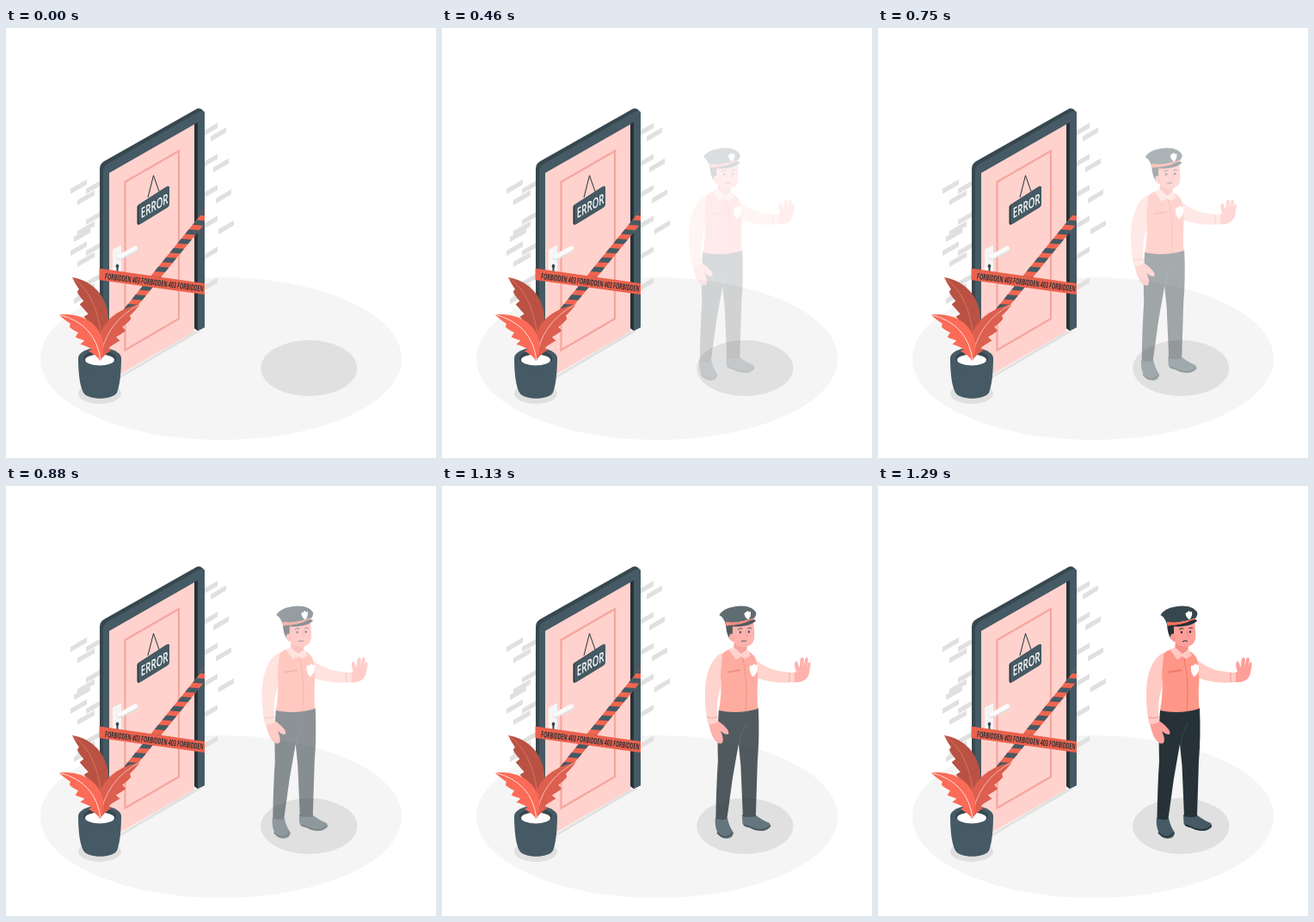
These frames come from a looping animation (500x500 px, 1.33 s). An HTML page:

```html
<!DOCTYPE html>
<html lang="en">
<head>
<meta charset="utf-8">
<title>403 Forbidden</title>
<style>
  html, body { margin: 0; width: 100%; height: 100%; overflow: hidden; background: #fff; }
  svg { display: block; width: 100%; height: 100%; }
  text { font-family: "Open Sans", "Noto Sans", sans-serif; font-weight: 700; }
</style>
</head>
<body>
<svg viewBox="0 0 500 500" xmlns="http://www.w3.org/2000/svg">
  <defs>
    <clipPath id="doorway"><path d="M109 150H231V420H109Z"/></clipPath>
  </defs>

  <ellipse cx="250" cy="384.5" rx="210" ry="94.5" fill="#f5f5f5"/>
  <ellipse cx="352.3" cy="395.5" rx="56" ry="32.5" fill="#e0e0e0"/>
  <path id="bricks" fill="#e0e0e0"/>

  <!-- door -->
  <path d="M120 412L219 353L227 352L133 407Z" fill="#e0e0e0"/>
  <path d="M109 405V164Q109 158 114 155L221 94.500Q224 92.500 228 95L231 98V348L223 352L219 349V116L120 172V405Z" fill="#37474f"/>
  <path d="M113 405V167Q113 161 118 158L225 97Q231 95 231 100V348L223 352V110L120 168V405Z" fill="#455a64"/>
  <path d="M219 112L223 109.500V352L219 349Z" fill="#263238"/>
  <path d="M120 168.500L219 112V353L120 410Z" fill="#ffd2cd"/>
  <path d="M138.500 179L201 143V338L138.500 374.500Z" fill="none" stroke="#f5a69e" stroke-width="2.200"/>

  <!-- sign -->
  <path d="M165 197L171.500 171.500L178 190" fill="none" stroke="#263238"/>
  <path id="sign" d="M154 207.500Q154 205.500 156 204.500L187 184.500Q190 182.500 190 185.500V205Q190 207.500 188 208.500L157 227.500Q154 229 154 226Z" fill="#455a64"/>
  <text transform="matrix(.6 -.34 0 1 156.700 221.500)" font-size="16.300" fill="#fff" style="font-weight: 600">ERROR</text>

  <!-- handle -->
  <path d="M124 257.500L134 252.500V284L124 287Z" fill="#f5f5f5"/>
  <path d="M132 267L150.500 257.500" stroke="#e0e0e0" stroke-width="6" stroke-linecap="round"/>
  <path d="M132 266L150.500 256" stroke="#fafafa" stroke-width="5" stroke-linecap="round"/>
  <path d="M129.500 274.500a2 2.500 0 0 1 1 4.500V284H128.500V279a2 2.500 0 0 1 1-4.500Z" fill="#37474f"/>

  <!-- tapes -->
  <g clip-path="url(#doorway)">
    <g transform="translate(231 219.500) rotate(129.200)">
      <path d="M-12 -5H195V5H-12Z" fill="#f1654f"/>
      <path id="stripes" fill="#455a64"/>
    </g>
  </g>
  <path d="M108.500 279.500L231 297V310L108.500 293Z" fill="#eb614d"/>
  <text transform="matrix(.547 .071 -.12 1 114.800 291.800)" font-size="9.500" fill="#263238">FORBIDDEN 403 FORBIDDEN 403 FORBIDDEN</text>

  <!-- plant -->
  <ellipse cx="109" cy="425" rx="25" ry="12" fill="#e0e0e0"/>
  <path d="M84 384C84 402 86 417 90 424C95 433 124 433 129 424C132 417 134 402 134 384Z" fill="#455a64"/>
  <ellipse cx="109" cy="384" rx="25" ry="12.500" fill="#455a64"/>
  <ellipse cx="109" cy="384" rx="19" ry="9" fill="#37474f"/>
  <ellipse cx="109" cy="386" rx="17" ry="6.500" fill="#fff"/>
  <g id="leaves"></g>

  <!-- guard -->
  <g id="guard" opacity="0">
    <path d="M324 386H338Q340 396 344.500 402Q346 409 337 410Q328 409 326 402Q323 394 324 386Z" fill="#455a64"/>
    <path d="M355 382H370Q379 389 387 392Q391 398 380 401Q369 401 364 397Q357 397 355.500 392Z" fill="#455a64"/>
    <path d="M326 403Q335 413 344.500 403M357 394L365 397Q378 404 388 395" fill="none" stroke="#263238" stroke-width="1.500"/>
    <path d="M328 260Q350 265 374 258Q375.500 290 373 320L371 384Q363 386 356 384L353.500 325L351 300L344 340L337.500 387Q331 389 324.500 386.500Q325 350 327 320Q326 285 328 260Z" fill="#263238"/>
    <path d="M352 303Q353 285 361 276" fill="none" stroke="#37474f"/>

    <path d="M316 275L327 273Q333 277 338 283Q341 288 338 289Q333 288 330 285Q334 293 332.500 298Q330 301 326 298Q319 293 316 275Z" fill="#ff9f99"/>
    <path d="M332 194Q318 200 313 226Q310 248 315 276Q322 278 327 274Q324 251 330 235Z" fill="#ffcac3"/>

    <path d="M412 218L418 216Q415 208 417 204.500Q419.500 202 420 207L422 211L422.500 202Q425 197 427 201.500L426.500 210L428.500 200.500Q431.500 197.500 432 202L430.500 211L432 205.500Q435.500 203.500 434.500 209L432.500 220Q428 230 413 228Z" fill="#ff9f99"/>
    <path d="M369 201Q383 212 397 215L416 217.500V228Q394 231 372 223Z" fill="#ffcac3"/>
    <path d="M314 269Q321 271 326.500 268.500M410 217V228" fill="none" stroke="#f28f82" stroke-width=".9"/>

    <path d="M346 179L361 184L360 195L351 200L345 192Z" fill="#f48e87"/>
    <path d="M332 195Q336 191 343 189L354 198L362 192Q371 196 372 206L373.500 224Q372 243 373.500 259Q350 266 328 261Q332 240 330 220Z" fill="#ff9788"/>
    <path d="M345 187L354 195L361 190L365 197L358 201L354 198L348 202L340 191Z" fill="#ffcac3"/>
    <path d="M356 200Q362 228 359 262" fill="none" stroke="#ed7768"/>
    <path d="M338 216.500L353 214" stroke="#ed7768" stroke-width="2.200"/>
    <path d="M364 209Q368 209 369 206.500Q370 208.500 373 208V214Q372 219 367.500 222Q363 217 364 209Z" fill="#fff"/>

    <path d="M336 160H347L345 181Q337 178 336 160Z" fill="#263238"/>
    <path d="M344 161L368 158Q370 172 369 178Q367 186 358 187.500Q349 187 345 181Q340 180 340 175Q341 171 344 172Z" fill="#ff9f99"/>
    <path d="M341.500 173Q345 173 344.500 179M359 169Q362 175 359.500 176" fill="none" stroke="#e77d76" stroke-width=".8"/>
    <path d="M350 167Q353 164.500 355.500 166M361.500 165.500Q364 164 366 165.500M354 181Q357 179 360 180.500" fill="none" stroke="#263238"/>
    <ellipse cx="353" cy="170" rx="1.200" ry="1.600" fill="#263238"/>
    <ellipse cx="363" cy="169.500" rx="1.200" ry="1.600" fill="#263238"/>

    <path d="M328.500 150Q333 142.500 345 140.500Q358 138 366 142Q372 146 371.500 149Q371 152 368 155L336 161Q334 153 328.500 150Z" fill="#37474f"/>
    <path d="M336 158Q352 160 368 153.500L369.500 157Q355 164 336.500 162.500Z" fill="#ff725e"/>
    <path d="M337 162Q354 162 365 156Q371 154 371 157Q366 162 355 163Q345 164.500 337 162Z" fill="#263238"/>
    <path d="M357.500 148L360 146.500L361.500 145L363 146.500L365 146Q366 152 362 155.500Q358 153 357.500 148Z" fill="#fff"/>
  </g>
</svg>
<script>
  const byId = id => document.getElementById(id);
  const range = n => Array.from({ length: n }, (_, i) => i);

  // Two courses of bricks per row, stepping down both sides of the door.
  const brick = (x, y, w) => `M${x} ${y}l${w} ${-0.577 * w}v6l${-w} ${0.577 * w}Z`;
  const rowHeight = 36;
  const leftRow = k => brick(93, 187 + k * rowHeight, 17) +
    brick(83, 200 + k * rowHeight, 20) +
    (k % 2 ? brick(79, 207 + k * rowHeight, 19) : brick(75, 187 + k * rowHeight, 19));
  const rightRow = k => brick(231, 119 + k * rowHeight, 15) +
    (k < 4 ? brick(238 + 3 * k, 126 + k * rowHeight, 18) : "");
  byId("bricks").setAttribute("d",
    range(4).map(leftRow).join("") + range(6).map(rightRow).join(""));

  byId("stripes").setAttribute("d",
    range(15).map(i => `M${i * 14 - 12} -5h7l7 10h-7Z`).join(""));

  // A leaf bends along a quadratic axis: one side is smooth, the other lobed.
  function addLeaf({ base, bend, tip, smooth, lobed, lobes, fill, vein }) {
    const axis = (t, i) => (1 - t) ** 2 * base[i] + 2 * t * (1 - t) * bend[i] + t * t * tip[i];
    const slope = (t, i) => 2 * (1 - t) * (bend[i] - base[i]) + 2 * t * (tip[i] - bend[i]);
    const edge = (t, width) => {
      const dx = slope(t, 0), dy = slope(t, 1), k = width / Math.hypot(dx, dy);
      return `${axis(t, 0) - dy * k} ${axis(t, 1) + dx * k}`;
    };
    const swell = t => Math.sin(Math.PI * t ** 0.85);
    const steps = range(61).map(i => i / 60);
    const outline = [
      ...steps.map(t => edge(t, smooth * swell(t))),
      ...steps.reverse().map(t => edge(t, lobed * swell(t) * (0.65 + 0.45 * (t * lobes % 1))))
    ];
    byId("leaves").insertAdjacentHTML("beforeend",
      `<path d="M${outline.join("L")}Z" fill="${fill}"/>
       <path d="M${base}Q${bend} ${tip}" fill="none" stroke="${vein}" stroke-width=".8"/>`);
  }
  addLeaf({ base: [112, 372], bend: [109, 311], tip: [77, 290],
    smooth: 13, lobed: -15, lobes: 5, fill: "#b95243", vein: "#e77967" });
  addLeaf({ base: [109, 387], bend: [115, 342], tip: [156, 321],
    smooth: -9, lobed: 15, lobes: 5, fill: "#dc5f4f", vein: "#ffd0c8" });
  addLeaf({ base: [110, 387], bend: [105, 344], tip: [61, 333],
    smooth: 10, lobed: -16, lobes: 5, fill: "#fb6b57", vein: "#fff" });

  // The sign's thickness is a darker copy behind it.
  const sign = byId("sign"), back = sign.cloneNode();
  back.removeAttribute("id");
  back.setAttribute("fill", "#263238");
  back.setAttribute("transform", "translate(-1.5 .8)");
  sign.before(back);

  const LOOP = 1330, FPS = 24, FIRST = 6, LAST = 31;
  const guard = byId("guard");

  const stepTime = n => Math.round(n * 100 / FPS) * 10;

  function stepAt(ms) {
    let n = LAST;
    while (n > 0 && stepTime(n) > ms) n--;
    return n === FIRST + 1 ? FIRST : n;
  }

  // cubic-bezier(.42, 0, 1, 1)
  function easeIn(x) {
    let lo = 0, hi = 1;
    for (let i = 0; i < 24; i++) {
      const s = (lo + hi) / 2;
      if (1.26 * s + 0.48 * s * s - 0.74 * s ** 3 < x) lo = s; else hi = s;
    }
    return lo * lo * (3 - 2 * lo);
  }

  function draw(ms) {
    const n = stepAt(ms);
    const shown = easeIn(n / LAST);
    guard.setAttribute("opacity", n < FIRST ? 0 : shown);
    guard.setAttribute("transform", `translate(${-30 * (1 - shown)} 0)`);
  }

  const start = performance.now();
  function tick() {
    draw((performance.now() - start) % LOOP);
    requestAnimationFrame(tick);
  }
  tick();
</script>
</body>
</html>
```
